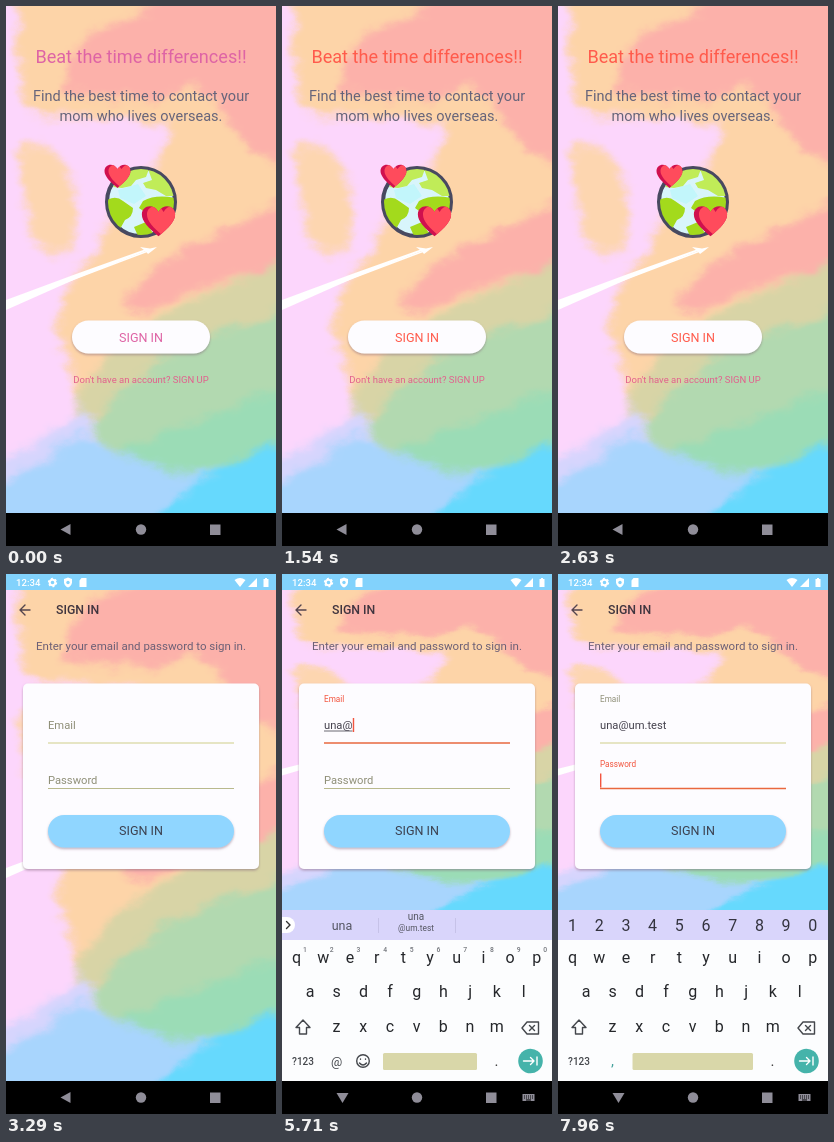
Animation, 270 px wide and 540 px high, one loop 8000 ms. Source, as an HTML page:

```html
<!DOCTYPE html>
<html lang="en">
<head>
<meta charset="utf-8">
<title>Sign in</title>
<style>
  html, body { margin: 0; height: 100%; overflow: hidden; background: #000; }
  svg { display: block; width: 100vw; height: 100vh; font-family: Roboto, sans-serif; }
  .mid { text-anchor: middle; }
  .line { fill: none; stroke-width: 1.4; stroke-linecap: round; stroke-linejoin: round; }
</style>
</head>
<body>
<svg viewBox="0 0 270 540">
  <defs>
    <filter id="paint" filterUnits="userSpaceOnUse" x="-20" y="-20" width="310" height="547" color-interpolation-filters="sRGB">
      <feGaussianBlur stdDeviation="4" result="soft"/>
      <feTurbulence type="fractalNoise" baseFrequency=".03 .05" numOctaves="4" seed="7"/>
      <feDisplacementMap in="soft" scale="20" xChannelSelector="R" yChannelSelector="G"/>
    </filter>
    <filter id="shadow" x="-10%" y="-20%" width="120%" height="150%">
      <feDropShadow dx="0" dy="1.5" stdDeviation="1.3" flood-color="#806078" flood-opacity=".5"/>
    </filter>
    <clipPath id="sea"><circle cx="135" cy="196" r="33"/></clipPath>
    <path id="heart" d="M0 11.5C-8 5-13-.5-13-5.500C-13-12.500-4-14.500 0-7.500C4-14.500 13-12.500 13-5.500C13-.5 8 5 0 11.500Z"/>
    <clipPath id="heartShape"><use href="#heart"/></clipPath>
    <g id="love">
      <use href="#heart" fill="#d0104e"/>
      <g clip-path="url(#heartShape)"><use href="#heart" x="4" fill="#ff4b5c"/></g>
    </g>
  </defs>

  <g id="backdrop">
    <g filter="url(#paint)">
      <path fill="#fcd6fc" d="M-60-60H340V600H-60Z"/>
      <path fill="#fdd4a8" d="M14-50H320V345L75 405Q62 360 50 312Q62 268 90 245Q108 200 138 168Q164 145 160 116Q110 112 62 110Q28 122 20 95L12 40Z"/>
      <path fill="#fdd6b0" d="M14 145Q40 122 64 170Q76 212 66 245Q34 258 20 215Z"/>
      <path fill="#fcb1aa" d="M60 60Q75 25 120 14L220-40H320V180Q255 155 225 122Q215 95 188 82Q120 104 56 84Z"/>
      <path fill="#fcb1aa" d="M118 300Q145 258 190 238Q240 212 320 178V245Q205 275 140 308Z"/>
      <path fill="#d8d4a6" d="M68 408Q76 365 130 325Q200 285 320 236V340L100 440Z"/>
      <path fill="#b2d9b0" d="M82 425Q115 378 165 348Q220 322 320 285V480H105Z"/>
      <path fill="#d6d5fd" d="M-50 472Q35 442 78 400L105 460V520H-50Z"/>
      <path fill="#a8d5fd" d="M-50 500Q30 468 74 428Q110 450 150 456L320 420V600H-50Z"/>
      <path fill="#9bdcb6" d="M112 444Q190 415 320 370V425Q215 470 165 466Z"/>
      <path fill="#66d9fd" d="M125 560Q155 492 200 470L320 414V600Z"/>
    </g>
    <path fill="#fff" d="M0 294L70 268L140 243L141 244.500L72 272L0 304Z"/>
    <path fill="none" stroke="#fff" stroke-width="1.500" d="M60 276L142 245"/>
    <path fill="#fff" d="M134 241L144 242.500L151 241L146 245L142 248L140 245.500Z"/>
  </g>

  <g id="welcome">
    <g class="mid">
      <text id="title" x="135" y="57" font-size="18.1">Beat the time differences!!</text>
      <g font-size="14.5" fill="#66647a">
        <text x="135" y="95">Find the best time to contact your</text>
        <text x="135" y="115">mom who lives overseas.</text>
      </g>
    </g>
    <circle cx="135" cy="196" r="34" fill="#d8f5fb" stroke="#484960" stroke-width="4"/>
    <g clip-path="url(#sea)">
      <path fill="#c2f6fb" d="M112 184L132 178L140 190L128 198L114 192Z"/>
      <path fill="#a3da1c" d="M101 194Q110 189 117 195L127 202Q127 211 119 214L114 223Q103 214 101 202Z"/>
      <path fill="#c0ec58" d="M119 165Q130 160 143 163L140 171L130 174L125 180L116 182L107 181Z"/>
      <path fill="#c0ec58" d="M142 163Q165 168 170 190L160 190L150 184L140 182L137 177L146 174Z"/>
      <path fill="#a3da1c" d="M137 195Q150 188 169 192V208L140 207L133 202Z"/>
      <path fill="#a3da1c" d="M128 221L140 216L148 229L132 230Z"/>
    </g>
    <use href="#love" transform="translate(111.500 170.500)"/>
    <use href="#love" transform="translate(152.500 215.500) scale(1.28)"/>
    <rect x="66" y="314.500" width="138" height="33" rx="16.500" fill="#fdfcff" filter="url(#shadow)"/>
    <g class="mid">
      <text id="enter" x="135" y="335.500" font-size="12.600">SIGN IN</text>
      <text x="135" y="377" font-size="9.500" fill="#e2608d">Don't have an account? SIGN UP</text>
    </g>
  </g>

  <g id="login">
    <path class="line" stroke="#54454e" d="M24 36H14.500M19 31L14 36L19 41"/>
    <text x="50" y="39.500" font-size="12.300" font-weight="500" fill="#40353f">SIGN IN</text>
    <text class="mid" x="135" y="75.500" font-size="11.500" fill="#6c6076">Enter your email and password to sign in.</text>
    <rect x="17" y="109.500" width="236" height="185.500" rx="5" fill="#fdfcff" filter="url(#shadow)"/>
    <text id="emailLabel" x="42">Email</text>
    <text id="passwordLabel" x="42">Password</text>
    <text id="email" x="42" y="155" font-size="11.200" fill="#45424e"></text>
    <path id="composing" stroke="#45424e" stroke-width=".8"/>
    <path id="emailLine" d="M42 169H228"/>
    <path id="passwordLine" d="M42 214.500H228"/>
    <rect id="caret" width="1.400" height="14" fill="#f2553f"/>
    <rect x="42" y="241" width="186" height="32.500" rx="16.200" fill="#90d6ff" filter="url(#shadow)"/>
    <text class="mid" x="135" y="261" font-size="12.600" fill="#3c4150">SIGN IN</text>
  </g>

  <g id="status" fill="#fff">
    <path fill="#82d2fc" d="M0 0H270V16H0Z"/>
    <text x="10" y="12" font-size="9.600" font-weight="500">12:34</text>
    <circle cx="46.500" cy="8.500" r="2.800" fill="none" stroke="#fff" stroke-width="2"/>
    <circle cx="46.500" cy="8.500" r="4" fill="none" stroke="#fff" stroke-width="1.400" stroke-dasharray="2 2.190"/>
    <path d="M62 3.500L66 5V8.500Q65.500 12 62 13.500Q58.500 12 58 8.500V5Z"/>
    <circle cx="62" cy="8.500" r="1.700" fill="#82d2fc"/>
    <path d="M75.500 4H80.500V13H73.500V6.500ZM228.500 6Q234 2 239.500 6L234 13ZM242 13L251 4V13ZM257.500 5H259V4H261V5H262.500V13H257.500Z"/>
  </g>

  <g id="keyboard">
    <path fill="#fcfdfe" d="M0 336H270V508H0Z"/>
    <path fill="#d9d5fb" d="M0 336H270V366H0Z"/>
    <g id="keys" class="mid" font-size="16" fill="#25272b"></g>
    <g id="digits" class="mid" font-size="16" fill="#34343f"></g>
    <g id="hints" class="mid" font-size="6.800" font-weight="500" fill="#73767c"></g>
    <g id="suggestions" class="mid" fill="#555663">
      <path fill="#fff" d="M0 343H5A8 8 0 0 1 5 359H0Z"/>
      <path class="line" stroke="#333" d="M4.500 347.500L8 351L4.500 354.500"/>
      <text id="single" x="134" y="356" font-size="12.500"></text>
      <g id="split">
        <text x="60" y="356" font-size="12.500">una</text>
        <text x="134" y="346" font-size="10">una</text>
        <text x="134" y="357" font-size="8.400">@um.test</text>
        <path stroke="#c6c2e8" d="M96.500 344V359M173.500 344V359"/>
      </g>
    </g>
    <g class="line" stroke="#44474c">
      <path d="M21 446L28 453.500H24.500V460H17.500V453.500H14Z"/>
      <path d="M245 448H256.500V460H245L240 454ZM247.500 451.500L252.500 456.500M252.500 451.500L247.500 456.500"/>
    </g>
    <text class="mid" x="21" y="491" font-size="10" font-weight="500" fill="#44474c">?123</text>
    <g id="mailKeys">
      <text class="mid" x="54.500" y="492" font-size="12.500" fill="#44474c">@</text>
      <g class="line" stroke="#44474c">
        <circle cx="81" cy="487" r="6.300"/>
        <path d="M78.500 485V485.200M83.500 485V485.200M77.500 489Q81 493 84.500 489"/>
      </g>
    </g>
    <text id="comma" class="mid" x="54.500" y="492" font-size="15" fill="#45a29c">,</text>
    <rect id="space" y="479" height="17" rx="1.500" fill="#d9d7a9"/>
    <text class="mid" x="214.500" y="492" font-size="15" fill="#333">.</text>
    <circle cx="248.500" cy="487" r="12.300" fill="#45b3aa"/>
    <path class="line" stroke="#fff" d="M241.500 487H252M248.500 483.500L252 487L248.500 490.500M255 483V491"/>
  </g>

  <path d="M0 507H270V540H0Z"/>
  <g fill="#8f8d98">
    <path id="back"/>
    <circle cx="135" cy="523.500" r="5.200"/>
    <path d="M204 518.500H214.500V529H204Z"/>
    <g id="switcher">
      <path d="M240.500 520H252.500V527H240.500Z"/>
      <path stroke="#000" stroke-dasharray="1 1" d="M242 522H251M242 524H251"/>
      <path stroke="#000" d="M244 526H249"/>
    </g>
  </g>
</svg>

<script>
const LOOP = 8000, OPEN = 2680, FOCUS = 3500, PICK = 6350, NEXT = 6900;
const ADDRESS = "una@um.test";
const keyTimes = [4200, 4600, 5000, 5500];
const rest = [143, 143, 120], red = [242, 85, 63];
const pink = [222, 100, 165], coral = [255, 91, 76];

const $ = id => document.getElementById(id);
const set = (id, attrs) => {
  for (const name in attrs) $(id).setAttribute(name, attrs[name]);
};
const show = (id, on) => set(id, { visibility: on ? "visible" : "hidden" });
const mix = (a, b, p) => a + (b - a) * p;
const blend = (a, b, p) => `rgb(${a.map((v, i) => mix(v, b[i], p)).join()})`;
const ease = (t, start, length) => {
  const p = Math.min(1, Math.max(0, (t - start) / length));
  return 1 - (1 - p) ** 3;
};

function addRow(id, letters, x, y) {
  [...letters].forEach((letter, i) => {
    const text = document.createElementNS("http://www.w3.org/2000/svg", "text");
    text.textContent = letter;
    text.setAttribute("x", x + i * 26.7);
    text.setAttribute("y", y);
    $(id).append(text);
  });
}
addRow("keys", "qwertyuiop", 14.5, 389);
addRow("keys", "asdfghjkl", 28, 423);
addRow("keys", "zxcvbnm", 54.5, 458);
addRow("digits", "1234567890", 14.5, 357);
addRow("hints", "1234567890", 23, 378);

function drawField(name, t, start, end, y, floatY, idleLine) {
  const p = ease(t, start, 180), active = t >= start && t < end;
  set(name + "Label", {
    y: mix(y, floatY, p),
    "font-size": mix(11.2, 8.2, p),
    fill: blend(rest, red, active ? p : 0)
  });
  set(name + "Line", {
    stroke: active ? "#e9683f" : idleLine,
    "stroke-width": active ? 1.6 : 1.2
  });
}

function draw(t) {
  const opened = ease(t, OPEN, 350), raised = ease(t, FOCUS, 260);
  const onEmail = t < NEXT, typing = t < PICK;
  const count = keyTimes.filter(time => t >= time).length;
  const value = typing ? ADDRESS.slice(0, count) : ADDRESS;

  const accent = blend(pink, coral, ease(t, 40, 400));
  for (const id of ["title", "enter"]) set(id, { fill: accent });
  set("welcome", { opacity: 1 - opened });
  set("login", { opacity: opened, transform: `translate(0 ${30 * (1 - opened)})` });
  set("status", { opacity: opened });
  set("backdrop", { transform: `scale(1 ${t < FOCUS + 240 ? 1 : 336 / 507})` });

  drawField("email", t, FOCUS, NEXT, 155, 128, "#d0d08a");
  drawField("password", t, NEXT, LOOP, 209.5, 192.5, "#b9b98d");
  $("email").textContent = value;
  const width = value ? $("email").getComputedTextLength() : 0;
  set("composing", { d: `M42 157H${42 + width}` });
  show("composing", typing && count > 0);

  const lastInput = [FOCUS, ...keyTimes, PICK, NEXT].filter(time => t >= time).pop();
  show("caret", lastInput !== undefined && (t - lastInput) % 1000 < 500);
  set("caret", { x: onEmail ? 42.3 + width : 42, y: onEmail ? 144 : 199.5 });

  set("keyboard", { transform: `translate(0 ${172 * (1 - raised)})` });
  show("keyboard", raised > 0);
  const mail = raised > 0 && onEmail;
  for (const id of ["hints", "mailKeys", "suggestions"]) show(id, mail);
  for (const id of ["digits", "comma"]) show(id, !onEmail);
  $("single").textContent = typing && count < 4 ? value : "";
  show("split", mail && typing && count === 4);
  set("space", { x: onEmail ? 101 : 74.5, width: onEmail ? 94 : 120.5 });

  set("back", { d: raised > 0 ? "M54.500 519H66.500L60.500 529Z" : "M54.500 523.500L64.500 518V529Z" });
  show("switcher", raised > 0);
}

const begin = performance.now();
function frame() {
  draw((performance.now() - begin) % LOOP);
  requestAnimationFrame(frame);
}
frame();
</script>
</body>
</html>
```
